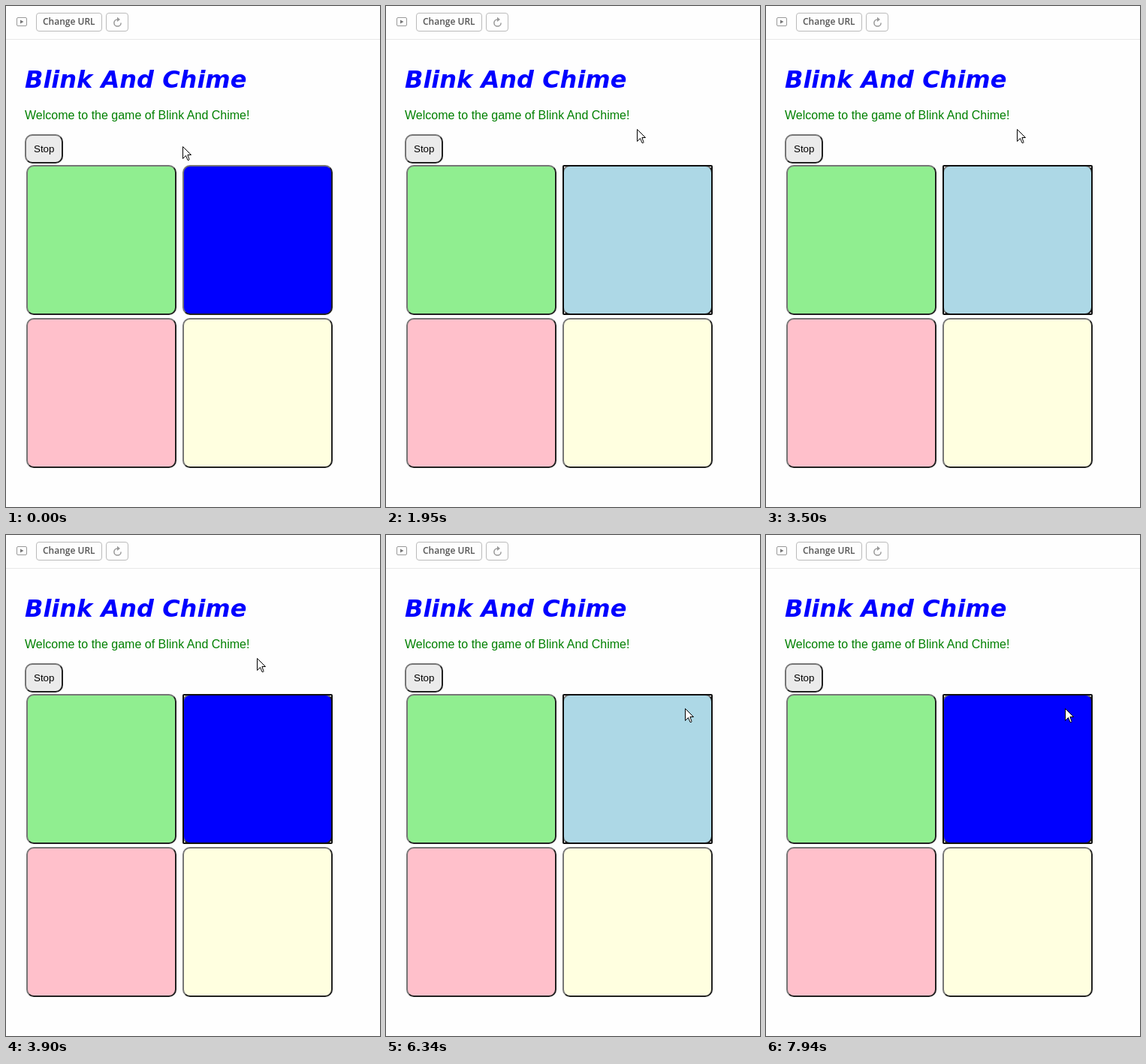
Recreate the animation shown at these times as an HTML page. Size 498 by 668 pixels, loop 8000 ms.

```html
<!DOCTYPE html>
<html lang="en">
<head>
<meta charset="utf-8">
<title>Blink And Chime</title>
<style>
html, body { margin: 0; width: 100%; height: 100%; overflow: hidden; background: #fefefe; }
.stage { position: relative; width: 498px; height: 668px; overflow: hidden; }
.stage > * { position: absolute; box-sizing: border-box; }
.stage > svg { left: 0; top: 0; }
.bar { left: 0; top: 0; width: 498px; height: 45px; border-bottom: 1px solid #e8e8e8; }
.tool { top: 9px; height: 25px; border: 1px solid #bbb; border-radius: 4px; }
.key { border: 2px outset #767676; border-radius: 10px; }
.stop { left: 25px; top: 171px; width: 51px; height: 39px; background: #ebebeb; }
.pad, .ring { width: 200px; height: 200px; }
.ring { left: 235px; top: 212px; border: 2px solid #101010; border-radius: 2px; opacity: 0; }
text { white-space: pre; }
.title { font: italic bold 32px "DejaVu Sans", sans-serif; fill: #00f; }
.intro { font: 16px "Liberation Sans", Arial, sans-serif; fill: #008000; }
.caption { font: 13.333px "Liberation Sans", Arial, sans-serif; }
.label { font: 600 12px "Open Sans", sans-serif; fill: #555; }
</style>
</head>
<body>
<div class="stage" id="stage">
  <div class="bar"></div>
  <div class="tool" style="left:40px;width:88px"></div>
  <div class="tool" style="left:133px;width:30px"></div>
  <div class="key stop"></div>

  <svg width="498" height="668">
    <rect x="14.5" y="15.5" width="13" height="11" rx="1.5" fill="none" stroke="#999"/>
    <path d="M19 18.5 L23.5 21 L19 23.5 Z" fill="#777"/>
    <text class="label" x="49" y="25">Change URL</text>
    <path d="M148.5 17.9 A4.6 4.6 0 1 0 153.1 22.5" fill="none" stroke="#999" stroke-width="1.5"/>
    <path d="M148 14.8 L152 17.9 L148 21 Z" fill="#999"/>
    <text class="title" x="25" y="109">Blink And Chime</text>
    <text class="intro" x="25" y="151">Welcome to the game of Blink And Chime!</text>
    <text class="caption" x="37" y="195">Stop</text>
  </svg>

  <div class="ring" id="ring"></div>
  <svg id="cursor" width="13" height="20">
    <path d="M.5 .5 V16.5 L4.5 12.5 L7 18.5 H8.5 L9 17.5 L6.9 11.5 H11.5 Z" fill="#fff" stroke="#000"/>
  </svg>
</div>
<script>
const LOOP = 8000;
const TICK = 130; // pause between two positions of the moving pointer
const byId = id => document.getElementById(id);

const pads = ["lightgreen", "blue", "pink", "lightyellow"].map((color, i) => {
  const pad = document.createElement("div");
  pad.className = "key pad";
  pad.style.left = 27 + 208 * (i % 2) + "px";
  pad.style.top = 212 + 204 * (i >> 1) + "px";
  pad.style.background = color;
  byId("stage").insertBefore(pad, byId("ring"));
  return pad;
});

// Each step is [start in ms, value] and holds until the next one.
function hold(el, prop, steps) {
  const last = steps[steps.length - 1][1];
  const frames = [...steps, [LOOP, last]].map(([at, value]) => ({
    offset: at / LOOP, [prop]: value, easing: "step-end"
  }));
  el.animate(frames, { duration: LOOP, iterations: Infinity });
}

const flips = [0, 400, 2510, 3500, 3900, 4830, 6620, 7480, 7940];
hold(pads[1], "backgroundColor", flips.map((at, i) => [at, i % 2 ? "lightblue" : "blue"]));

hold(byId("ring"), "opacity", [[0, 0], [1530, 1]]);

// Pointer strokes: start in ms, number of even hops, end point.
const strokes = [
  [0, 1, 235, 187],
  [1260, 2, 300, 286], [1800, 1, 311, 246], [1950, 1, 334, 164],
  [4830, 1, 327, 180], [4960, 2, 302, 327], [5340, 2, 318, 294],
  [5740, 2, 400, 237], [6040, 3, 398, 231]
];

const hops = strokes.flatMap(([start, count, x, y], i) => {
  const [, , fromX, fromY] = strokes[Math.max(0, i - 1)];
  const mix = (a, b, k) => Math.round(a + (b - a) * (k + 1) / count);
  return Array.from({ length: count }, (_, k) =>
    [start + k * TICK, `translate(${mix(fromX, x, k)}px, ${mix(fromY, y, k)}px)`]);
});
hold(byId("cursor"), "transform", hops);
</script>
</body>
</html>
```
